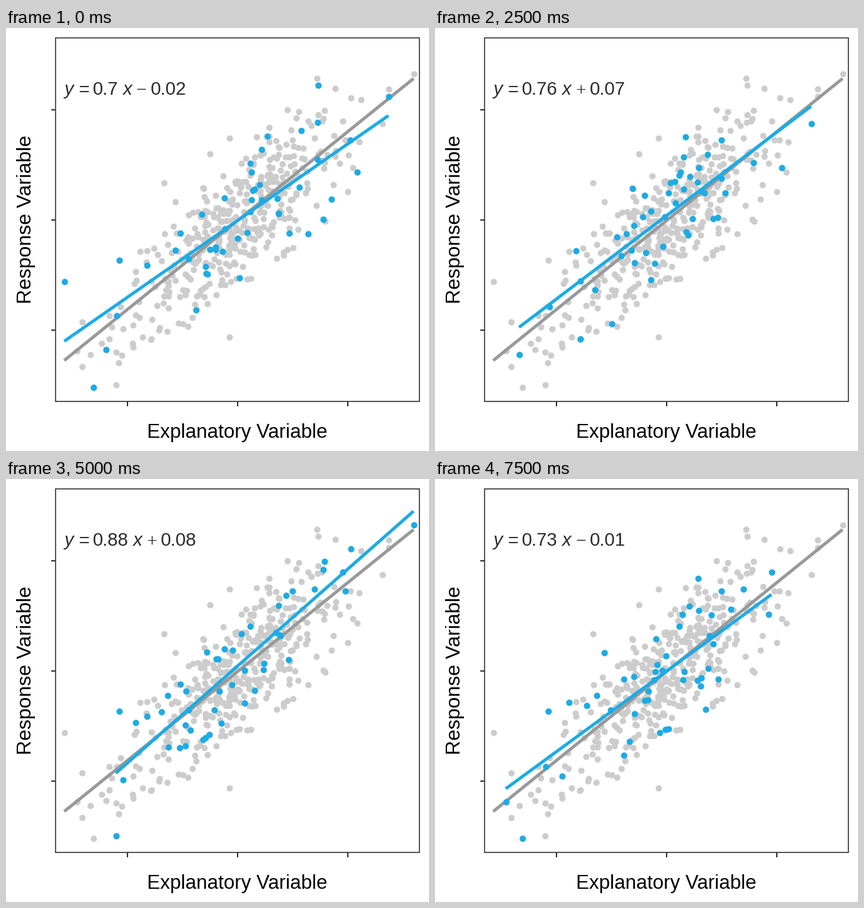
A matplotlib script that plays this animation: 672x672 px, repeating every 8 s.

```python
import numpy as np
import matplotlib.pyplot as plt
from matplotlib.animation import FuncAnimation
from matplotlib.patches import Rectangle

SIZE, DPI = 672, 96
PX = 72 / DPI                      # points per pixel
CX, CY, UNIT = 367, 304, 87.5      # data origin and scale in pixels
GREY, DARK, BLUE, INK = "#cccccc", "#999999", "#1cabe4", "#2b2b2b"
SLOPE, ICPT = 0.807, -0.02
POPULATION, SAMPLE = 450, 48

# A few points that mark the extremes of the cloud
EXTREMES = np.array([
    (92, 402), (112, 512), (120, 466), (120, 537), (133, 518), (151, 500),
    (174, 566), (200, 500), (250, 245), (323, 199), (354, 174), (354, 490),
    (493, 79), (523, 194), (534, 147), (550, 221), (597, 151), (607, 96),
    (607, 108), (647, 72)], float)

# Regression line of each sample: slope, intercept, first x, last x
DRAWS = [
    (0.696, -0.02, 92, 607), (0.83, 0.08, 112, 647),
    (0.76, -0.05, 151, 550), (0.988, 0.07, 120, 607),
    (0.85, 0.03, 133, 597), (0.757, 0.07, 133, 597),
    (0.81, -0.06, 151, 550), (0.887, 0.016, 151, 550),
    (0.98, 0.2, 120, 607), (0.825, 0.18, 120, 523),
    (0.88, 0.08, 174, 647), (0.79, -0.04, 151, 550),
    (0.617, 0.116, 200, 597), (0.78, 0.05, 200, 534),
    (0.72, -0.07, 120, 597), (0.731, -0.012, 112, 534),
]


def line_y(x, slope, icpt):
    return CY - icpt * UNIT - slope * (x - CX)


def make_population(rng):
    x, res = rng.normal([[365], [0]], [[85], [53]], (2, 4 * POPULATION))
    keep = (abs(x - 355) < 225) & (abs(res) < 115)
    x, res = x[keep][:POPULATION], res[keep][:POPULATION]
    cloud = np.column_stack([x, line_y(x, SLOPE, ICPT) + res])
    return np.vstack([np.round(cloud), EXTREMES])


def pick_sample(rng, slope, icpt, x0, x1):
    """Of many random samples, keep the one whose fit is nearest the line."""
    def end(x):
        on_x = EXTREMES[EXTREMES[:, 0] == x]
        return on_x[abs(on_x[:, 1] - line_y(x, slope, icpt)).argmin()]

    pool = people[(people[:, 0] > x0) & (people[:, 0] < x1)]
    best, low = None, np.inf
    for _ in range(300):
        more = rng.choice(pool, SAMPLE - 2, replace=False)
        pts = np.vstack([end(x0), more, end(x1)])
        s, b = np.polyfit((pts[:, 0] - CX) / UNIT, (CY - pts[:, 1]) / UNIT, 1)
        miss = abs(s - slope) + abs(b - icpt)
        if miss < low:
            best, low = pts, miss
    return best


rng = np.random.default_rng(12)
people = make_population(rng)
samples = [pick_sample(rng, *d) for d in DRAWS]

fig = plt.figure(figsize=(SIZE / DPI, SIZE / DPI), dpi=DPI, facecolor="white")
ax = fig.add_axes([0, 0, 1, 1])
ax.set_xlim(-0.5, SIZE - 0.5)
ax.set_ylim(SIZE - 0.5, -0.5)
ax.axis("off")


def stroke(x, y, color, width, z):
    return ax.plot(x, y, color=color, lw=width * PX, zorder=z,
                   solid_capstyle="butt")[0]


def dots(pts, color, z):
    return ax.plot(pts[:, 0], pts[:, 1], "o", color=color, ms=10 * PX,
                   mew=0, zorder=z)[0]


def label(x, y, s, px, color=INK, font="Liberation Sans", **kw):
    return ax.text(x, y, s, fontsize=px * PX, color=color, family=font,
                   va="baseline", zorder=6, **kw)


# Panel, ticks and axis titles
ax.add_patch(Rectangle((78.2, 15.2), 578, 577.6, fill=False, ec=INK,
                       lw=1.6 * PX, zorder=5, snap=False))
for t in (-175, 0, 175):
    stroke([CX + t] * 2, [593, 600.5], INK, 2, 5)
    stroke([71, 78.5], [CY + t] * 2, INK, 2, 5)
label(CX, 650, "Explanatory Variable", 31.25, "black", ha="center")
label(40, CY, "Response Variable", 32, "black", ha="center",
      rotation=90, rotation_mode="anchor")

# Population and its line
dots(people, GREY, 1)
ends = np.array([92, 647])
stroke(ends, line_y(ends, SLOPE, ICPT), DARK, 5, 2)

# Sample, its line and the equation
blue_dots = dots(samples[0], BLUE, 3)
blue_line = stroke([], [], BLUE, 5, 4)
EQ, BASE = 29.2, 106
label(92.5, BASE, "y", EQ, style="italic")
label(115, BASE, "=", EQ)
coef = label(137.5, BASE, "", EQ)
var_x = label(0, BASE, "x", EQ, style="italic")
sign = label(0, BASE, "", EQ, font="Liberation Serif")
const = label(0, BASE, "", EQ)


def update(i):
    slope, icpt, x0, x1 = DRAWS[i]
    x = np.array([x0, x1])
    blue_dots.set_data(*samples[i].T)
    blue_line.set_data(x, line_y(x, slope, icpt))

    num = str(round(slope, 2))
    shift = 0.556 * EQ * (len(num) - 3)
    coef.set_text(num)
    sign.set_text("+" if icpt > 0 else "\u2212")
    const.set_text(str(round(abs(icpt), 2)))
    for part, left in ((var_x, 184.5), (sign, 206.5), (const, 229.5)):
        part.set_x(left + shift)
    return blue_dots, blue_line, coef, var_x, sign, const


anim = FuncAnimation(fig, update, frames=len(DRAWS), interval=500,
                     repeat=True, repeat_delay=0, blit=False)
plt.show()
```
